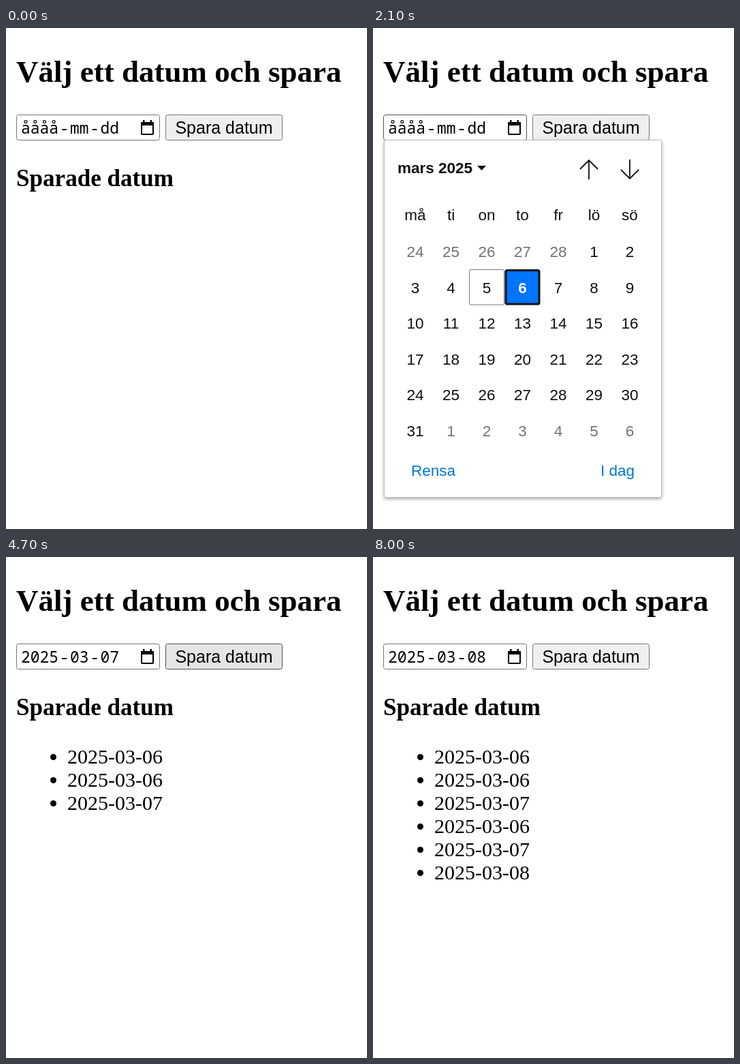
An HTML page for the animation above (8800 ms loop, 530 px wide and 735 px high).

```html
<!DOCTYPE html>
<html lang="sv">
<head>
<meta charset="utf-8">
<title>Välj ett datum och spara</title>
<style>
  html, body { margin: 0; width: 100%; height: 100%; overflow: hidden; background: #fff; }
  svg { display: block; width: 530px; height: 735px; }
  .serif { font: 30px "Liberation Serif", serif; }
  .h1 { font-size: 45px; font-weight: bold; }
  .h2 { font-size: 35.1px; font-weight: bold; }
  .mono { font: 22.9px "Noto Sans Mono", monospace; }
  .ui { font: 25px "Liberation Sans", sans-serif; }
  .cal { font: 22.5px "Liberation Sans", sans-serif; fill: #101010; }
  .dim { fill: #737373; }
  .link { fill: #0075d1; }
  .bold { font-weight: bold; }
  .picked { font-weight: bold; fill: #fff; }
  .mid { text-anchor: middle; }
  .end { text-anchor: end; }
  .sheet { filter: drop-shadow(0 2px 2.5px rgba(0, 0, 0, .35)); }
</style>
</head>
<body>
<svg id="stage" viewBox="0 0 530 735"></svg>
<script>
const LOOP = 8800, TODAY = 5;
const stage = document.getElementById('stage');
const iso = day => '2025-03-0' + day;

// Each step: time in ms and what changes. Feb 27 and 28 are days -1 and 0.
const open = { popup: 1 };
const shut = day => ({ popup: 0, hover: null, value: day, field: 'idle' });
const toField = { button: 'idle', field: 'hover' };
const steps = [
  [0, { button: 'idle', field: 'idle', value: 0, picked: TODAY, hover: null, popup: 0, saved: [] }],
  [500, { button: 'hover' }],
  [1000, toField],
  [1200, { popup: .4 }], [1300, { popup: .85 }], [1400, open],
  [1600, { hover: -1 }], [1800, { hover: 6 }],
  [2100, { picked: 6 }], [2200, shut(6)],
  [2500, { button: 'hover' }], [2600, { button: 'down' }],
  [2700, { button: 'hover', saved: [6] }],
  [2900, { button: 'idle' }], [3000, toField],
  [3200, { popup: .4 }], [3300, { popup: .85 }], [3400, open],
  [3700, { hover: 7 }],
  [4000, { picked: 7 }], [4100, shut(7)],
  [4400, { button: 'hover' }], [4600, { button: 'down' }],
  [4700, { button: 'hover', saved: [6, 6, 7] }],
  [5200, toField],
  [5700, open],
  [5900, { hover: -1 }], [6000, { hover: 0 }], [6100, { hover: 8 }],
  [6400, { picked: 8 }], [6500, shut(8)],
  [6800, { button: 'hover' }], [7100, { button: 'down' }],
  [7200, { button: 'hover', saved: [6, 6, 7, 6, 7, 8] }],
  [8000, { button: 'idle' }]
];

const text = (x, y, cls, s) => `<text x="${x}" y="${y}" class="${cls}">${s}</text>`;
const rect = (x, y, w, h, fill, stroke = 'none', rx = 0, sw = 1) =>
  `<rect x="${x}" y="${y}" width="${w}" height="${h}" rx="${rx}" fill="${fill}" stroke="${stroke}" stroke-width="${sw}"/>`;
const path = (d, attrs) => `<path d="${d}" ${attrs}/>`;

const edge = { idle: '#767676', hover: '#4f4f4f', down: '#8d8d8d' };
const face = { idle: '#efefef', hover: '#e5e5e5', down: '#f5f5f5' };

function dateField({ field, value }) {
  const [y, m, d] = value ? iso(value).split('-') : ['åååå', 'mm', 'dd'];
  return rect(15.5, 127.5, 210, 37, '#fff', edge[field], 3) +
    text(22, 155, 'mono', y) + text(85.5, 155, 'mono mid', '-') +
    text(94, 155, 'mono', m) + text(130, 155, 'mono mid', '-') +
    text(138.5, 155, 'mono', d) +
    rect(199, 139, 17, 17, 'none', '#000', 1, 2) +
    path('M198 138h19v5h-19zM201 135h2.5v4h-2.5zM211.5 135h2.5v4h-2.5z', '');
}

function dayCell(i, { picked, hover }) {
  const day = i - 4, col = i % 7, row = Math.floor(i / 7);
  const x = 141 + 52.5 * (col - 2), y = 301.5 + 52.5 * row;
  const label = day < 1 ? day + 28 : day > 31 ? day - 31 : day;
  let box = '', cls = day < 1 || day > 31 ? 'dim' : '';
  if (day === picked) {
    box = rect(x + 1.5, y + 1.5, 49, 49.5, '#0075ff', '#101010', 2, 3);
    cls = 'picked';
  } else if (day === hover) {
    box = rect(x, y, 52, 52.5, '#efefef', 'none', 2);
  } else if (day === TODAY) {
    box = rect(x + .5, y + .5, 51, 51.5, 'none', '#767676', 2);
  }
  return box + text(x + 26, y + 34.7, 'cal mid ' + cls, label);
}

function calendar(s) {
  const week = ['må', 'ti', 'on', 'to', 'fr', 'lö', 'sö'];
  return `<g opacity="${s.popup}">` +
    `<g class="sheet">${rect(16.5, 164.5, 407, 524, '#fff', '#bfbfbf', 2)}</g>` +
    text(36, 213, 'cal bold', 'mars 2025') +
    path('M153 202h13l-6.5 7z', 'fill="#101010"') +
    path('M317 222V194M304 207l13 -13 13 13M377 193v28M364 208l13 13 13 -13',
      'fill="none" stroke="#101010" stroke-width="1.8"') +
    week.map((w, i) => text(62 + 52.5 * i, 282, 'cal mid', w)).join('') +
    Array.from({ length: 42 }, (_, i) => dayCell(i, s)).join('') +
    text(56, 657, 'cal link', 'Rensa') + text(384, 657, 'cal link end', 'I dag') + '</g>';
}

function draw(s) {
  stage.innerHTML =
    text(15, 79, 'serif h1', 'Välj ett datum och spara') +
    dateField(s) +
    rect(234.5, 127.5, 171, 37, face[s.button], edge[s.button], 3) +
    text(320, 155, 'ui mid', 'Spara datum') +
    text(15, 232, 'serif h2', 'Sparade datum') +
    s.saved.map((day, i) => `<circle cx="69.5" cy="${293.5 + 34 * i}" r="4.5"/>` +
      text(90, 303 + 34 * i, 'serif', iso(day))).join('') +
    (s.popup ? calendar(s) : '');
}

let shown = 0;
function tick() {
  const t = performance.now() % LOOP;
  const past = steps.filter(([at]) => at <= t);
  if (past.length !== shown) {
    shown = past.length;
    draw(Object.assign({}, ...past.map(([, change]) => change)));
  }
  requestAnimationFrame(tick);
}
tick();
</script>
</body>
</html>
```
